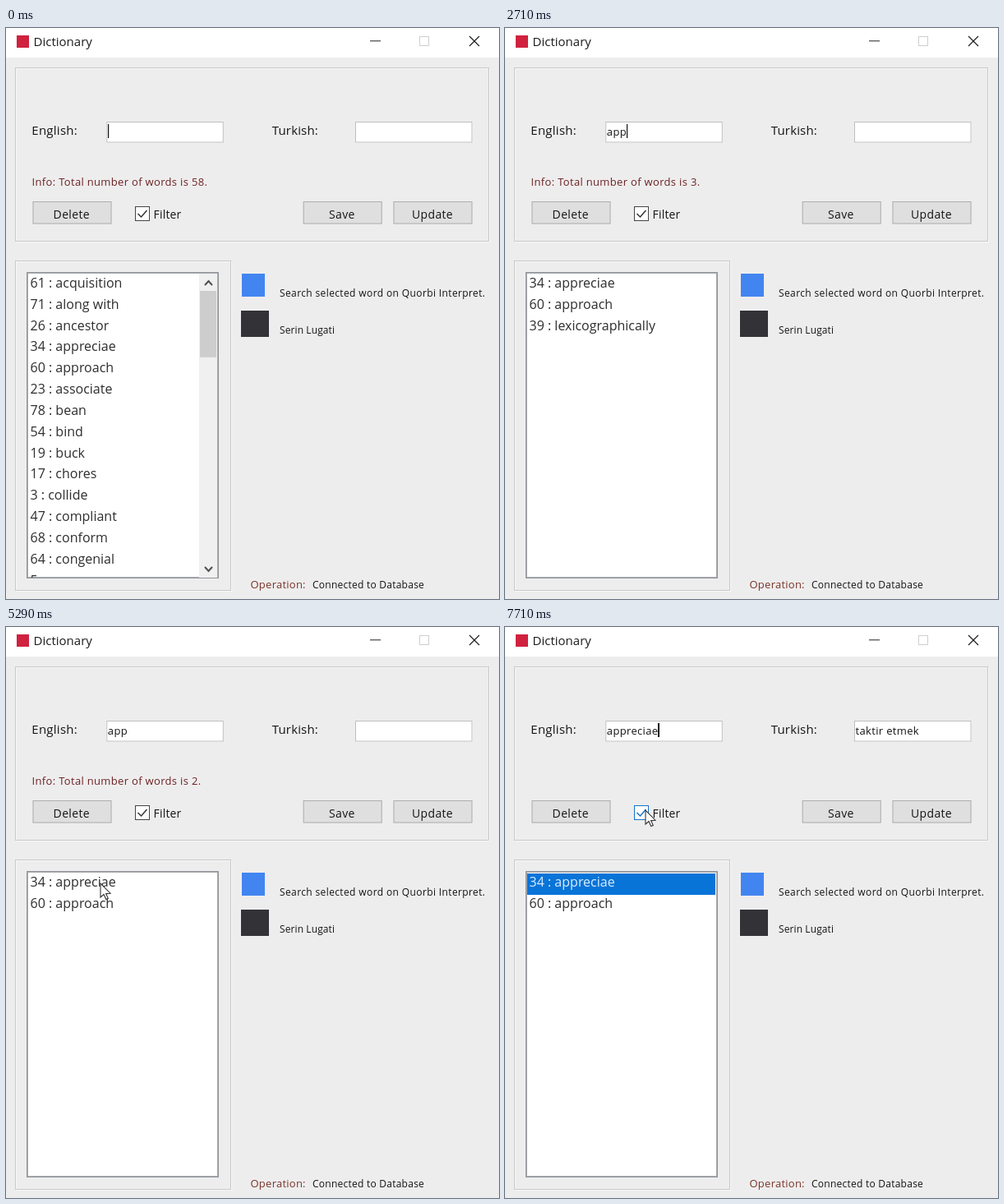
An HTML page with a canvas that plays this animation: 600 px wide and 695 px high, repeating every 8 s.

```html
<!DOCTYPE html>
<html lang="en">
<head>
<meta charset="utf-8">
<title>Dictionary</title>
<style>
  html, body { margin: 0; width: 100%; height: 100%; overflow: hidden; background: #eeedee; }
  canvas { display: block; width: 600px; height: 695px; }
</style>
</head>
<body>
<canvas id="stage" width="600" height="695"></canvas>
<script>
const ctx = document.getElementById('stage').getContext('2d');
const FONT = '"Open Sans", "Noto Sans", sans-serif';
const LOOP = 8000;
const TICKS_PER_SECOND = 7;

const WORDS = [
  '61 : acquisition', '71 : along with', '26 : ancestor', '34 : appreciae',
  '60 : approach', '23 : associate', '78 : bean', '54 : bind', '19 : buck',
  '17 : chores', '3 : collide', '47 : compliant', '68 : conform',
  '64 : congenial', '5 : concern', '41 : decay', '29 : eager', '52 : fragile',
  '14 : gather', '39 : lexicographically', '66 : maintain', '8 : neat'
];
const TOTALS = { '': 58, a: 27, ap: 3, app: 2 };

// All times below are in ticks.
const TYPED = [[0, ''], [16, 'a'], [18, 'ap'], [19, 'app'], [39, 'appreciae']];
const FILTER = [[0, ''], [16, 'a'], [18, 'ap'], [20, 'app']];
const BLINKS = [0, 2, 5, 9, 12, 23, 26, 30, 33, 37, 39, 43, 46, 50, 53];
const SELECT = 39;
const HOVER = 40;
const MOUSE = [
  [35, 185, 170], [36, 145, 250], [37, 115, 312], [39, 112, 312], [40, 150, 245],
  [41, 201, 185], [42, 206, 180], [44, 195, 195], [47, 172, 222], [54, 171, 223]
];

const latest = (steps, k) => steps.filter(s => s[0] <= k).pop()[1];

function mouseAt(k) {
  if (k < MOUSE[0][0]) return null;
  const i = MOUSE.findIndex(p => p[0] > k);
  if (i < 0) return MOUSE[MOUSE.length - 1].slice(1);
  const [t0, x0, y0] = MOUSE[i - 1], [t1, x1, y1] = MOUSE[i];
  const f = (k - t0) / (t1 - t0);
  return [x0 + (x1 - x0) * f, y0 + (y1 - y0) * f];
}

function fill(x, y, w, h, color) {
  ctx.fillStyle = color;
  ctx.fillRect(x, y, w, h);
}

function frame(x, y, w, h, color) {
  ctx.strokeStyle = color;
  ctx.lineWidth = 1;
  ctx.strokeRect(x + .5, y + .5, w - 1, h - 1);
}

function box(x, y, w, h, bg, border) {
  fill(x, y, w, h, bg);
  frame(x, y, w, h, border);
}

function line(points, color, width) {
  ctx.beginPath();
  points.forEach(p => ctx.lineTo(...p));
  ctx.strokeStyle = color;
  ctx.lineWidth = width;
  ctx.stroke();
}

function text(str, x, y, size, color = '#1c1c1c', spacing = 0, weight = 400) {
  ctx.font = `${weight} ${size}px ${FONT}`;
  ctx.letterSpacing = spacing + 'px';
  ctx.fillStyle = color;
  ctx.fillText(str, x, y);
  return ctx.measureText(str).width;
}

// Form text is a little heavier than the list and the title.
const label = (str, x, y, size, spacing, color = '#151515') =>
  text(str, x, y, size, color, spacing, 500);

function panel(x, y, w, h) {
  frame(x + 1, y + 1, w, h, '#f8f8f8');
  frame(x, y, w, h, '#c9c8c9');
}

function button(caption, x, textX) {
  box(x, 211, 96, 27.5, '#e0dfe0', '#adadad');
  label(caption, textX, 232, 14, .35);
}

function titleBar() {
  fill(0, 0, 600, 36, '#fff');
  fill(13, 9, 15, 15, '#d0213f');
  text('Dictionary', 33.6, 22, 15);
  fill(443, 15.3, 13, 1, '#222');
  frame(503, 10, 12, 12, '#cfcfcf');
  line([[564, 10], [576, 22]], '#222', 1.2);
  line([[576, 10], [564, 22]], '#222', 1.2);
}

function field(x, value, caret) {
  box(x, 114, 142.5, 25.5, '#fff', '#c0bfc0');
  const w = label(value, x + 1.5, 130.7, 13, .35);
  if (caret) fill(Math.round(x + 1.5 + w), 117, value.length > 3 ? 2 : 1.2, 17, '#111');
}

function checkBox(hover) {
  box(157, 217, 18, 18, '#fff', hover ? '#1673c9' : '#444');
  line([[160.5, 226], [164.5, 230], [171.5, 222]], hover ? '#1673c9' : '#333', 1.5);
  label('Filter', 179.5, 232, 14, .2);
}

function scrollBar(total) {
  fill(235, 299, 22, 370, '#f0f0f0');
  fill(236, 320, 20, 330 * 14.2 / total, '#cdcdcd');
  line([[242, 313], [246.5, 308], [251, 313]], '#505050', 2);
  line([[242, 656], [246.5, 661], [251, 656]], '#505050', 2);
}

function wordList(query, selected) {
  box(25, 297, 234, 373, '#fff', '#929599');
  frame(26, 298, 232, 371, '#a9abae');
  ctx.save();
  ctx.beginPath();
  ctx.rect(27, 299, 230, 370);
  ctx.clip();
  if (selected) fill(27, 300, 229, 26, '#0874d8');
  WORDS.filter(w => w.includes(query)).slice(0, 15).forEach((w, i) => {
    text(w, 29.5, 316 + i * 25.83, 16, selected && i === 0 ? '#d9ecff' : '#2e2e2e');
  });
  if (TOTALS[query] > 14) scrollBar(TOTALS[query]);
  ctx.restore();
}

function pointer(x, y) {
  ctx.beginPath();
  [[0, 0], [0, 17], [4, 13.5], [6.8, 19.5], [9.3, 18.4], [6.6, 12.6], [12, 12.2]]
    .forEach(([dx, dy]) => ctx.lineTo(x + dx, y + dy));
  ctx.closePath();
  ctx.fillStyle = '#fff';
  ctx.fill();
  ctx.strokeStyle = '#333';
  ctx.lineWidth = 1.1;
  ctx.stroke();
}

function draw(k) {
  const selected = k >= SELECT;
  const query = latest(FILTER, k);
  const caret = BLINKS.filter(t => t <= k).length % 2 === 1;

  fill(0, 0, 600, 695, '#eeedee');
  titleBar();

  panel(11, 48, 577, 212);
  label('English:', 31.3, 130, 15, .25);
  field(122.3, latest(TYPED, k), caret);
  label('Turkish:', 323.8, 130, 15, .15);
  field(425, selected ? 'taktir etmek' : '', false);
  if (!selected) label(`Info: Total number of words is ${TOTALS[query]}.`, 31.6, 192.3, 13, .32, '#6c2222');
  button('Delete', 32.5, 57.6);
  button('Save', 361.7, 393);
  button('Update', 471.5, 494);
  checkBox(k >= HOVER);

  panel(11, 283, 263, 402);
  wordList(query, selected);

  fill(287, 299, 28, 28, '#4285f0');
  label('Search selected word on Quorbi Interpret.', 333, 327, 12, .38);
  fill(286, 344, 34, 32, '#333236');
  label('Serin Lugati', 333, 372, 12, .1);

  label('Operation:', 297.5, 682, 13, .25, '#7a3528');
  label('Connected to Database', 373, 682, 12, .25);

  const mouse = mouseAt(k);
  if (mouse) pointer(...mouse);
}

function loop(now) {
  const t = now % LOOP;
  draw(Math.floor((t + 5) * TICKS_PER_SECOND / 1000) % 56);
  requestAnimationFrame(loop);
}
requestAnimationFrame(loop);
</script>
</body>
</html>
```
